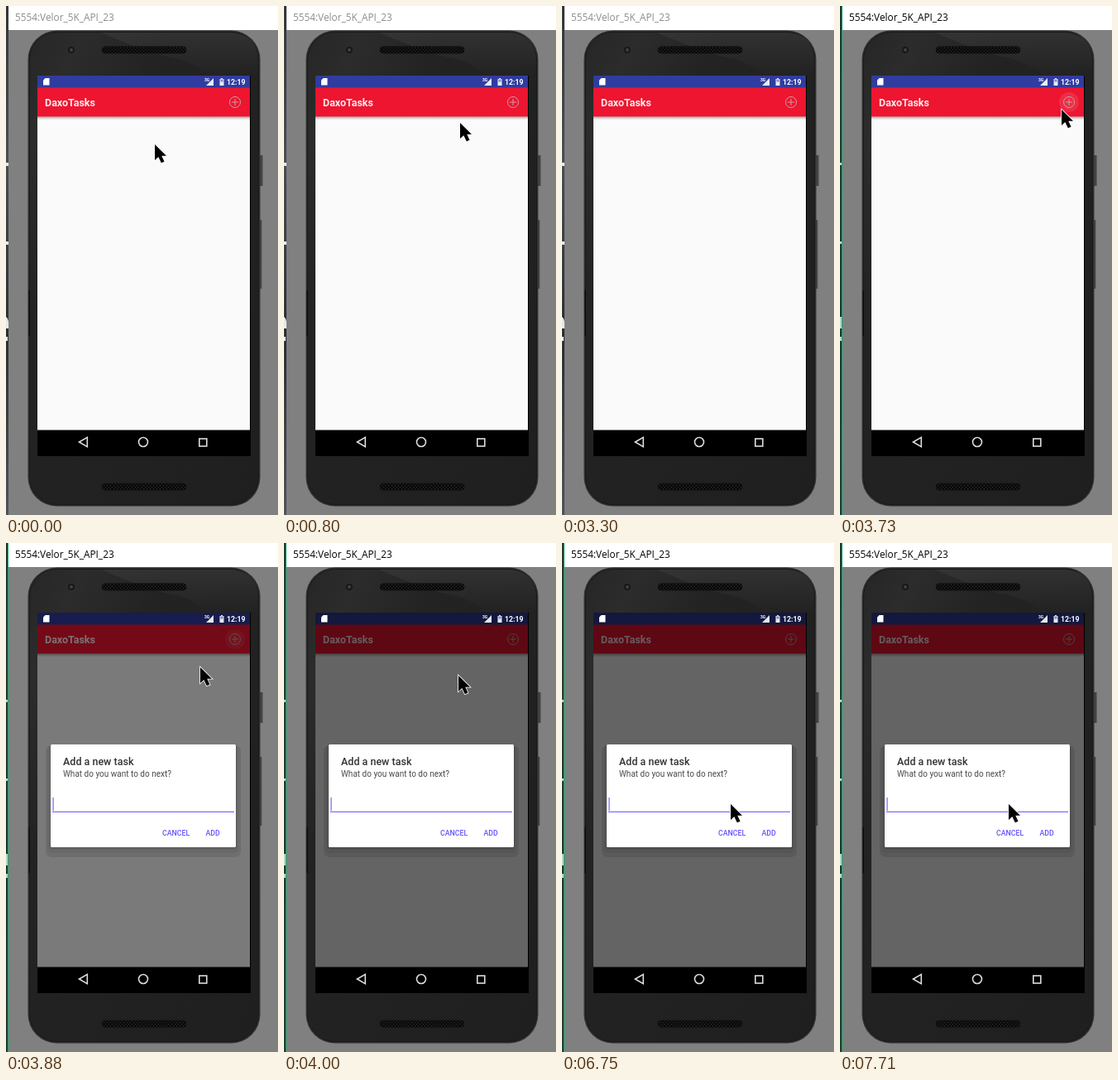
An HTML page that plays this animation: 329 px wide and 614 px high, repeating every 8 s.

```html
<!DOCTYPE html>
<html lang="en">
<head>
<meta charset="utf-8">
<title>Todo app demo</title>
<style>
html, body { margin: 0; width: 100%; height: 100%; overflow: hidden; background: #808080; }
svg { display: block; width: 329px; height: 614px; }
text { font-family: Roboto, Arial, sans-serif; }
.medium { font-weight: 500; }
.bold { font-weight: 700; }
.title { font: 11.8px "Open Sans", "Noto Sans", sans-serif; }
.line { fill: none; stroke: #dcdcdc; stroke-width: 1.6; }
</style>
</head>
<body>
<svg viewBox="0 0 329 614">
  <defs>
    <linearGradient id="face" x1="0" y1="0" x2="1" y2="1">
      <stop offset="0" stop-color="#262626"/>
      <stop offset=".12" stop-color="#2c2c2c"/>
      <stop offset=".3" stop-color="#232323"/>
      <stop offset="1" stop-color="#1f1f1f"/>
    </linearGradient>
    <linearGradient id="gloss" x1="0" y1="0" x2="0" y2="1">
      <stop offset="0" stop-color="#3b3b3b"/>
      <stop offset="1" stop-color="#3b3b3b" stop-opacity="0"/>
    </linearGradient>
    <linearGradient id="drop" x1="0" y1="0" x2="0" y2="1">
      <stop offset="0" stop-opacity=".3"/>
      <stop offset="1" stop-opacity="0"/>
    </linearGradient>
    <linearGradient id="wall" x1="0" y1="0" x2="0" y2="1">
      <stop offset="0" stop-color="#34353a"/>
      <stop offset=".3" stop-color="#4b4d52"/>
      <stop offset=".65" stop-color="#2c2d32"/>
      <stop offset="1" stop-color="#505258"/>
    </linearGradient>
    <pattern id="mesh" width="4" height="4" patternUnits="userSpaceOnUse">
      <rect width="4" height="4" fill="#0b0b0b"/>
      <path d="M0 0h1v1h-1zM2 2h1v1h-1z" fill="#343434"/>
    </pattern>
  </defs>

  <!-- desktop and window -->
  <rect width="329" height="614" fill="#808080"/>
  <rect width="3" height="614" fill="url(#wall)"/>
  <path id="marks" d="M0 189h3v4h-3zM0 284h3v4h-3zM0 375q3 2 3 7v7h-3zM0 399h2v5h-2z" fill="#e8e8e8"/>
  <g id="focus">
    <rect width="2" height="614" fill="#103b2b" opacity=".85"/>
    <path d="M0 189h2v3h-2zM0 284h2v3h-2zM0 375h2v14h-2zM0 399h2v5h-2z" fill="#a9dcc4"/>
    <rect x="2" width="1" height="614" fill="#22a56c"/>
  </g>
  <rect x="3" width="326" height="29" fill="#fff"/>
  <text id="caption" class="title" x="11" y="18">5554:Velor_5K_API_23</text>

  <!-- phone -->
  <path d="M307 180h3.500v37H307zM307 258h2.300v83H307z" fill="#444"/>
  <rect x="26.500" y="29.500" width="281" height="574" rx="35" fill="#303030"/>
  <rect x="28.500" y="31.500" width="277" height="570" rx="33" fill="url(#face)" stroke="#191919"/>
  <path d="M115 32H272Q304 34 305 64V84H245Q225 66 200 62T115 32" fill="url(#gloss)" opacity=".6"/>
  <rect x="27.500" y="343" width="1.500" height="55" fill="#0c0c0c"/>
  <circle cx="79" cy="53" r="4" fill="#181818"/>
  <circle cx="79" cy="53" r="2" fill="#3d4149"/>
  <rect x="116" y="49" width="102" height="8" rx="4" fill="url(#mesh)" stroke="#101010"/>
  <rect x="116" y="576" width="102" height="8" rx="4" fill="url(#mesh)" stroke="#101010"/>

  <!-- app -->
  <rect x="38" y="84" width="258" height="459"/>
  <rect x="38" y="98" width="257" height="413.500" fill="#fafafa"/>
  <rect x="38" y="84" width="257" height="15" fill="#303c9f"/>
  <rect x="38" y="98.500" width="257" height="35" fill="#ed1530"/>
  <rect x="38" y="133.500" width="257" height="4" fill="url(#drop)"/>
  <text class="bold" x="47" y="121" font-size="12.5" fill="#fff" fill-opacity=".9">DaxoTasks</text>
  <circle id="ripple" cx="277" cy="116" r="12" fill="#fff"/>
  <path d="M270.500 116a6.500 6.500 0 1 0 13 0a6.500 6.500 0 1 0 -13 0M273 116h8M277 112v8" fill="none" stroke="#c8a2a6"/>
  <rect id="scrim" x="38" y="84" width="257" height="428"/>

  <!-- status and navigation icons -->
  <g fill="#fff">
    <path d="M47.500 87H52.500V95.500H45V89.500z"/>
    <path d="M251 87v9h-9zM258.500 88h1.500v-1h2v1h1.500v8h-5z" fill-opacity=".9"/>
    <text x="240" y="91" font-size="5" font-weight="700">3G</text>
    <text class="bold" x="267" y="94.500" font-size="8.75">12:19</text>
  </g>
  <path d="M259.500 88.500h3v3h-3z" fill="#303c9f" opacity=".55"/>
  <g class="line">
    <path d="M88.500 526L98.300 520.300V531.700z"/>
    <circle cx="166" cy="526" r="5.500"/>
    <rect x="233.800" y="522" width="9" height="9"/>
  </g>

  <g id="dialog">
    <rect x="48" y="244" width="236" height="135" rx="7" fill-opacity=".1"/>
    <rect x="50" y="244" width="231" height="130" rx="5" fill-opacity=".05"/>
    <rect x="53" y="243" width="226" height="126" rx="3" fill-opacity=".1"/>
    <rect x="54" y="243" width="224" height="124" rx="1.500" fill="#fff"/>
    <text class="medium" x="69" y="267.500" font-size="12.5" fill="#333">Add a new task</text>
    <text x="69" y="282.300" font-size="10" fill="#484848">What do you want to do next?</text>
    <rect x="56" y="323.700" width="220" height="1.300" fill="#7d72ff"/>
    <rect id="caret" x="56.500" y="307" width="1.200" height="16" fill="#7468ff"/>
    <g class="medium" font-size="8.75" fill="#6152fb">
      <text x="189" y="352.500">CANCEL</text>
      <text x="241.500" y="352.500">ADD</text>
    </g>
  </g>

  <path id="cursor" d="M1 1V20L5.300 16L8.800 23.200L12.500 21.700L9.300 14.800H15z" stroke="#fff" stroke-width="1.600" paint-order="stroke"/>
</svg>
<script>
const LOOP = 8000;
// time, x, y; no position means the pointer is hidden
const pointer = [
  [0, 179, 166], [680, 188, 160], [800, 212, 140], [920, 235, 120],
  [1070, 258, 108], [1190, 272, 105], [1310, 276, 115], [3300],
  [3450, 276, 110], [3730, 267, 124], [3880, 234, 149], [4000, 210, 159],
  [4150, 207, 250], [4280, 203, 314], [4430, 203, 316], [4560, 203, 314]
];
const caretFlips = [3880, 4280, 4710, 5290, 5730, 6170, 6750, 7280, 7710];

const el = id => document.getElementById(id);
const set = (id, name, value) => el(id).setAttribute(name, value);
const show = (id, on) => set(id, "visibility", on ? "inherit" : "hidden");

function draw(t) {
  const focused = t >= 3450, open = t >= 3880;
  show("focus", focused);
  show("marks", !focused);
  set("caption", "fill", focused ? "#000" : "#8c8c8c");

  set("ripple", "opacity", !focused || t >= 4000 ? 0 : open ? 0.08 : 0.1);
  set("scrim", "opacity", !open ? 0 : t < 4000 ? 0.51 : 0.6);
  show("dialog", open);
  show("caret", caretFlips.filter(flip => t >= flip).length % 2);

  const [, x, y] = pointer.filter(step => t >= step[0]).pop();
  show("cursor", x !== undefined);
  if (x !== undefined) set("cursor", "transform", `translate(${x} ${y})`);
}

const start = performance.now();
function tick() {
  draw((performance.now() - start) % LOOP);
  requestAnimationFrame(tick);
}
tick();
</script>
</body>
</html>
```
